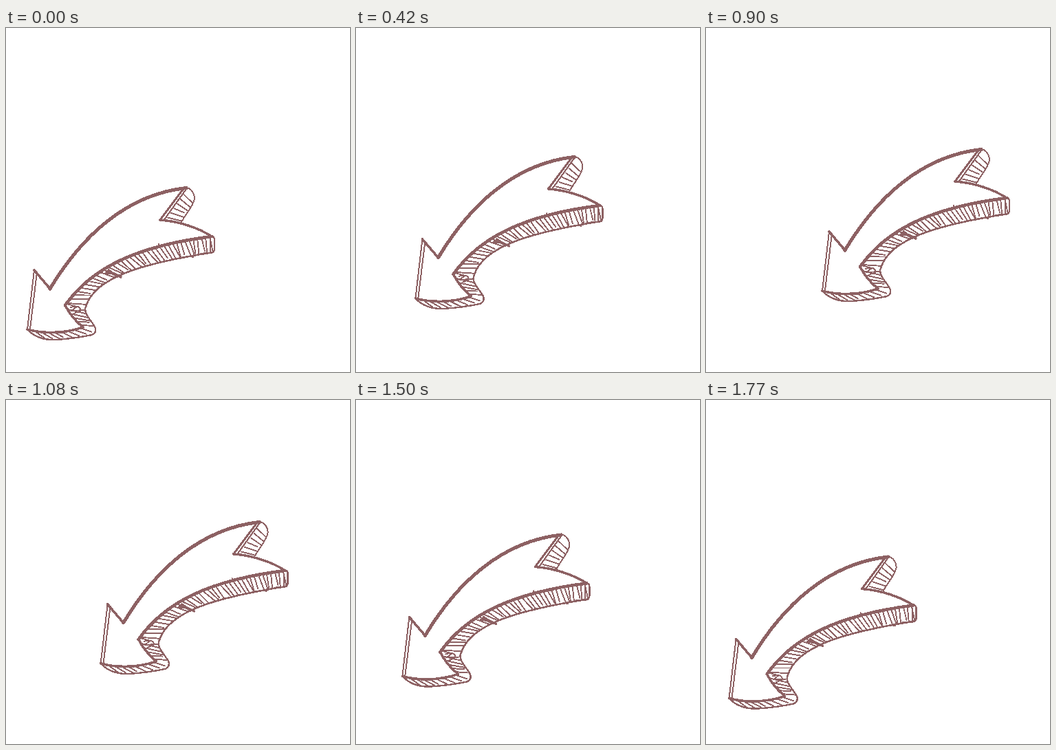
Recreate the animation shown at these times as an HTML page. Size 500 by 500 pixels, loop 1800 ms.

```html
<!DOCTYPE html>
<html>
<head>
<meta charset="utf-8">
<style>
  html, body { margin: 0; width: 100%; height: 100%; overflow: hidden; background: #fff; }
  svg { display: block; width: 100vw; height: 100vh; }
  path { fill: none; stroke: #8d6163; stroke-linecap: round; stroke-linejoin: round; shape-rendering: crispEdges; }
</style>
</head>
<body>
<svg viewBox="0 0 500 500"><g id="arrow"></g></svg>
<script>
const LOOP = 1800, STEP = 30;
const arrow = document.getElementById('arrow');

function makePath(d, width = 2) {
  const p = document.createElementNS('http://www.w3.org/2000/svg', 'path');
  p.setAttribute('d', d);
  p.setAttribute('stroke-width', width);
  return p;
}
const draw = (d, width) => arrow.append(makePath(d, width));

// Hatch lines joining two edges; ease spaces them, wobble keeps them hand-drawn
function hatch(from, to, count, wobble, ease = u => u) {
  const a = makePath(from), b = makePath(to);
  const la = a.getTotalLength(), lb = b.getTotalLength();
  let d = '';
  for (let i = 0; i < count; i++) {
    const t = ease((i + 0.5) / count);
    const shift = wobble * Math.sin(i * 12.9 + i * i * 1.7);
    const p = a.getPointAtLength(la * t);
    const q = b.getPointAtLength(lb * t + shift);
    const k = i % 5 === 3 ? 0.84 : 1;
    d += `M${p.x} ${p.y}L${p.x + (q.x - p.x) * k} ${p.y + (q.y - p.y) * k}`;
  }
  draw(d, 1.9);
}

const innerCurve = 'M86 403C124 349 189 317 299 303';
const outerCurve = 'M116 405C129 362 199 342 301 326';

// Front face
draw('M64 379C109 304 174 242 262 232.5', 5);
draw('M41 352L64 379', 3.6);
draw('M41 352L31 438M45 355L35 437', 2);
draw('M31 438C51 444 83 445 112 435', 3.6);
draw('M86 403C92 415 101 426 112 435', 3.6);
draw(innerCurve, 4.6);
draw('M224 279C251 281 279 290 299 303', 3.5);
draw('M257 235L224 279', 3);
draw('M262 234L229 280', 2.2);

// Side faces
draw('M262 232C269 233 274 240 274 248C272 260 261 270 254 284', 2);
draw('M299 303Q303 303 303 308V321Q303 326 298 327L283 328', 2.4);
draw(outerCurve, 2.6);
draw('M116 405C112 414 123 424 129 434Q133 442 125 446C106 450 89 452 73 453C54 454 41 449 31 438', 2.4);

// Shading
hatch(innerCurve, outerCurve, 36, 2.6, u => u * (1.12 - 0.12 * u));
hatch('M261 239L233 279', 'M273 252C269 262 259 271 253 283', 6, 1);
hatch('M39 441C59 445 89 443 111 434', 'M51 450C74 454 109 450 130 439', 8, 1.5);
hatch('M89 406C95 418 102 427 111 434', 'M114 413Q122 423 129 436', 5, 2);
draw('M88 401L103 405L95 411L115 410M94 406Q109 402 108 411L99 415', 1.9);
draw('M145 356L157 357L167 362M149 352L162 361', 3.2);
draw('M222 314V319M268 332L272 333M297 307V325', 2);

// Swing out and back at constant speed along a curved track
const track = makePath('M0 0C22 -41 70 -57 138 -56');
const length = track.getTotalLength();

function frame() {
  const t = Math.floor(performance.now() % LOOP / STEP) * STEP;
  const along = 1 - Math.abs(1 - 2 * t / LOOP);
  const p = track.getPointAtLength(length * along);
  arrow.setAttribute('transform', `translate(${p.x} ${p.y})`);
  requestAnimationFrame(frame);
}
frame();
</script>
</body>
</html>
```
